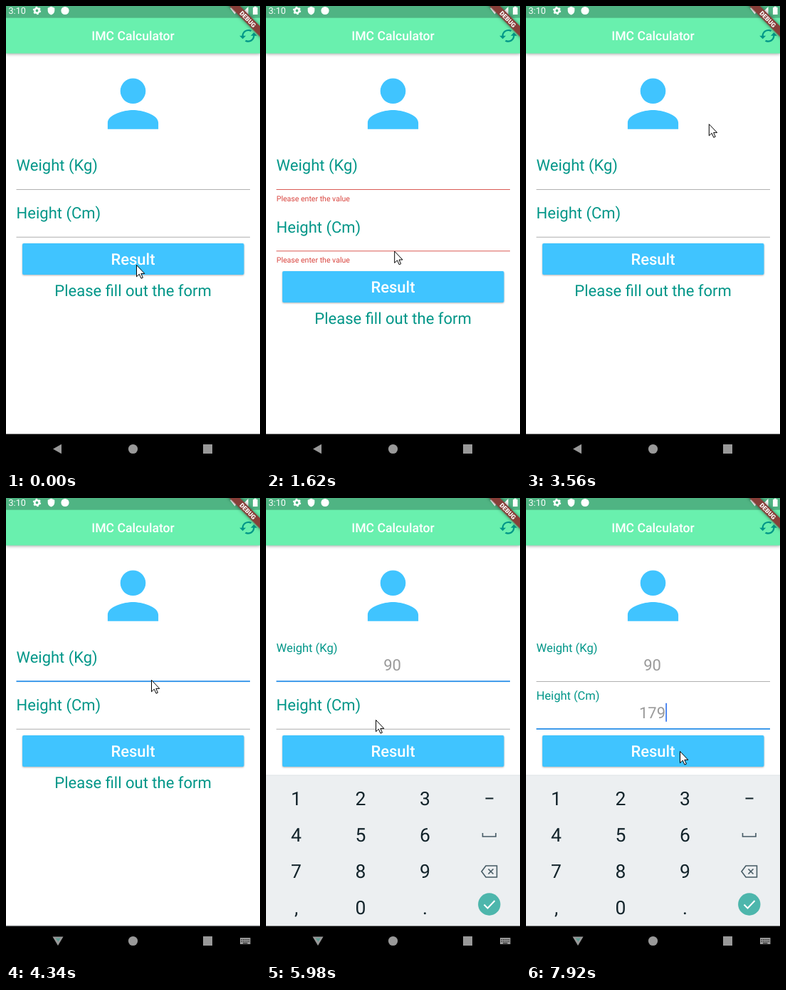
Recreate the animation shown at these times as an HTML page. Size 357x651 px, loop 8000 ms.

```html
<!DOCTYPE html>
<html lang="en">
<head>
<meta charset="utf-8">
<title>IMC Calculator</title>
<style>
  html, body { margin: 0; width: 100%; height: 100%; overflow: hidden; background: #fff; }
  svg { display: block; width: 357px; height: 651px; font-family: Roboto, sans-serif; text-rendering: geometricPrecision; }
  .mid { text-anchor: middle; }
  .teal { fill: #009688; }
  .label, .big { font-size: 22px; }
  .value { font-size: 22px; fill: #9a9a9a; }
  .error { font-size: 10.55px; fill: #d9453f; }
  .keys { font-size: 26.5px; fill: #13242b; }
  .icon { fill: none; stroke: #455a64; stroke-width: 1.6; }
  .bar { filter: drop-shadow(0 1.5px 2px rgba(0,0,0,.35)); }
  .button { filter: drop-shadow(0 1.5px 1.2px rgba(0,0,0,.3)); }
  .banner { filter: drop-shadow(0 0 2.5px rgba(0,0,0,.5)); }
</style>
</head>
<body>
<svg viewBox="0 0 357 651">
  <defs>
    <clipPath id="barClip"><rect width="357" height="66.5"/></clipPath>
    <clipPath id="buttonClip"><rect x="23" y="333" width="311.5" height="44" rx="2"/></clipPath>
    <clipPath id="bodyClip"><rect width="357" height="600.5"/></clipPath>
  </defs>
  <rect width="357" height="651" fill="#fff"/>

  <path transform="translate(125.1 83.7) scale(4.45)" fill="#40c4ff"
    d="M12 12a4 4 0 1 0 0-8 4 4 0 0 0 0 8zm0 2c-2.67 0-8 1.34-8 4v2h16v-2c0-2.66-5.33-4-8-4z"/>

  <g id="weight">
    <text class="label teal">Weight (Kg)</text>
    <text class="value mid" x="177.5" y="241.8"></text>
    <rect class="caret" y="221" width="1.8" height="26" fill="#3f7df0"/>
    <rect class="line" x="14.5" width="328.5"/>
    <text class="error" x="14.8">Please enter the value</text>
  </g>
  <g id="height">
    <text class="label teal">Height (Cm)</text>
    <text class="value mid" x="177.5" y="241.8"></text>
    <rect class="caret" y="221" width="1.8" height="26" fill="#3f7df0"/>
    <rect class="line" x="14.5" width="328.5"/>
    <text class="error" x="14.8">Please enter the value</text>
  </g>

  <g id="footer">
    <rect class="button" x="23" y="333" width="311.5" height="44" rx="2" fill="#40c4ff"/>
    <g clip-path="url(#buttonClip)"><circle id="press" cx="184" cy="363" fill="#fff"/></g>
    <text class="big mid" x="178.5" y="363" fill="#fff" font-weight="500">Result</text>
    <text class="big mid teal" x="178.5" y="406.5">Please fill out the form</text>
  </g>

  <rect class="bar" width="357" height="66.5" fill="#69f0ae"/>
  <g clip-path="url(#barClip)"><circle id="ripple" cx="340.5" cy="42" fill="#b4b8b5"/></g>
  <text class="mid" x="178.5" y="48.3" font-size="17.6" font-weight="500" fill="#fff">IMC Calculator</text>
  <path class="teal" transform="translate(327.1 28.4) scale(1.12)"
    d="M19 8l-4 4h3c0 3.31-2.69 6-6 6-1.01 0-1.97-.25-2.8-.7l-1.46 1.46C8.97 19.54 10.43 20 12 20c4.42 0 8-3.58 8-8h3zM6 12c0-3.31 2.69-6 6-6 1.01 0 1.97.25 2.8.7l1.46-1.46C15.03 4.46 13.57 4 12 4c-4.42 0-8 3.58-8 8H1l4 4 4-4z"/>

  <rect width="357" height="16.7" fill="#000" fill-opacity=".25"/>
  <g fill="#fff">
    <text x="3.5" y="11" font-size="12.6">3:10</text>
    <circle cx="43.5" cy="6.5" r="3.2" fill="none" stroke="#fff" stroke-width="2.6"/>
    <circle cx="43.5" cy="6.5" r="4.9" fill="none" stroke="#fff" stroke-width="1.6" stroke-dasharray="2.57 2.56"/>
    <path d="M63.5 .8l4.8 2v3.7c0 3-2 5-4.8 6-2.800-1-4.800-3-4.800-6V2.800z"/>
    <circle cx="83" cy="6.500" r="5.600"/>
    <path d="M315 3q6.500-5 13 0l-6.500 8.500z"/>
    <path d="M330 11.500h10.500V1z"/>
    <path d="M347 2h1.800V.7h3V2h1.800v10H347z"/>
  </g>
  <g transform="translate(357 0) rotate(45)">
    <rect class="banner" x="-35" y="20" width="70" height="10.4" fill="#873e38"/>
    <text class="mid" x="1" y="28.400" font-size="8.800" font-weight="900" fill="#fff">DEBUG</text>
  </g>

  <g clip-path="url(#bodyClip)">
    <g id="keyboard">
      <rect y="389" width="357" height="212" fill="#eceff1"/>
      <rect y="388.500" width="357" height="1" fill="#e0e3e5"/>
      <g id="keys" class="keys mid"></g>
      <path d="M308.500 421.500h11" stroke="#13242b" stroke-width="2"/>
      <path class="icon" d="M304.500 470v5h18.500v-5"/>
      <path class="icon" d="M309 516h15.500v16H309l-6-8zM312.500 520.500l7 7m0-7l-7 7"/>
      <circle cx="313.800" cy="570" r="15.700" fill="#4db6ac"/>
      <path d="M306.500 570.500l5 5 10-10.500" fill="none" stroke="#fff" stroke-width="2"/>
    </g>
  </g>

  <rect y="600.500" width="357" height="50.500" fill="#000"/>
  <g fill="#999">
    <path id="back" d="M66 621.500l12-6.700v13.400z"/>
    <g id="hide">
      <path d="M65.500 615.500h15l-7.500 12.500z"/>
      <path d="M69.500 617.500h7l-3 5z" fill="#5c9b92"/>
      <path d="M329 617h14.500v9H329z"/>
      <path d="M330.500 619.700h11.500m-11.500 2.500h11.500" stroke="#000" stroke-dasharray="1.300 1.200"/>
      <path d="M333 624.700h6.500" stroke="#000"/>
    </g>
    <circle cx="178.500" cy="621.500" r="6.600"/>
    <rect x="277" y="615" width="13" height="13"/>
  </g>

  <path id="pointer" d="M.5 .5V16.800l3.800-3.600 2.700 6 2.400-1.100-2.600-5.700h5z" fill="#fff" stroke="#000" stroke-linejoin="round"/>
</svg>
<script>
const LOOP = 8000;
const DIGIT = 22 * 0.5615;
const $ = id => document.getElementById(id);

const POINTER = [
  [0, 183, 363], [300, 183, 363], [610, 182, 351], [1540, 182, 351],
  [1620, 180, 344], [2400, 336, 46], [2950, 336, 46], [3330, 300, 93],
  [3560, 257, 165], [3880, 193, 242], [4110, 204, 255], [5080, 204, 255],
  [5450, 148, 318], [5670, 148, 318], [5900, 154, 311], [7560, 154, 311],
  [7900, 216, 355], [LOOP, 216, 355]
];
const ERROR_ON = 230, ERROR_OFF = 2570, COLLAPSE = 2770;
const KEYBOARD = 4330;

const FIELDS = [
  { id: 'weight', top: 0, focus: KEYBOARD, blur: 6060,
    typed: [[4505, '9'], [4740, '90']],
    caret: [[4420, 4905], [5300, 5680]] },
  { id: 'height', top: 66.8, focus: 6060, blur: LOOP,
    typed: [[6590, '1'], [7370, '17'], [7610, '179']],
    caret: [[6140, 7060], [7370, LOOP]] }
];

for (const f of FIELDS) {
  f.group = $(f.id);
  for (const part of ['label', 'value', 'caret', 'line', 'error'])
    f[part + 'El'] = f.group.querySelector('.' + part);
}

['123', '456', '789', ',0.'].forEach((row, r) => {
  [...row].forEach((key, c) => {
    const el = document.createElementNS('http://www.w3.org/2000/svg', 'text');
    el.setAttribute('x', 42.5 + 90.5 * c);
    el.setAttribute('y', 431.2 + 51 * r);
    el.textContent = key;
    $('keys').append(el);
  });
});

const set = (el, attrs) => {
  for (const name in attrs) el.setAttribute(name, attrs[name]);
};
const show = (el, on) => set(el, { visibility: on ? 'visible' : 'hidden' });
const ramp = (t, from, to) => Math.min(1, Math.max(0, (t - from) / (to - from)));
const ease = p => p * p * (3 - 2 * p);
const mix = (a, b, p) => a + (b - a) * p;
const move = (el, x, y) => set(el, { transform: `translate(${x} ${y})` });

function pointerAt(t) {
  const i = POINTER.findIndex(k => k[0] > t);
  const [t0, x0, y0] = POINTER[i - 1], [t1, x1, y1] = POINTER[i];
  const p = ramp(t, t0, t1);
  return [mix(x0, x1, p), mix(y0, y1, p)];
}

function drawField(f, t, shift, error) {
  move(f.group, 0, f.top + (f.top ? shift : 0));

  const float = ease(ramp(t, f.focus, f.focus + 170));
  set(f.labelEl, {
    transform: `translate(14.6 ${mix(231.3, 216, float)}) scale(${mix(1, 0.75, float)})`
  });

  const text = f.typed.reduce((s, [at, value]) => t >= at ? value : s, '');
  f.valueEl.textContent = text;
  set(f.caretEl, { x: 177.7 + text.length * DIGIT / 2 });
  show(f.caretEl, f.caret.some(([on, off]) => t >= on && t < off));

  const focused = t >= f.focus && t < f.blur;
  const mixed = [[176, 217], [176, 90], [176, 84]].map(([a, b]) => Math.round(mix(a, b, error)));
  set(f.lineEl, focused
    ? { y: 256.3, height: 1.8, fill: '#2a8fe8' }
    : { y: 257, height: 1, fill: `rgb(${mixed})` });
  set(f.errorEl, { y: mix(271, 274, error), opacity: error });
}

function drawSplash(el, t, start, grow, fadeStart, fadeEnd, radius, alpha) {
  const p = ramp(t, start, start + grow);
  set(el, {
    r: radius * ease(p),
    opacity: alpha * (1 - ramp(t, fadeStart, fadeEnd))
  });
}

function draw(t) {
  const shift = t >= ERROR_ON && t < COLLAPSE ? 19.5 : 0;
  const error = ease(ramp(t, ERROR_ON, ERROR_ON + 200)) * (1 - ease(ramp(t, ERROR_OFF, COLLAPSE)));
  FIELDS.forEach(f => drawField(f, t, shift, error));
  move($('footer'), 0, shift * 2);

  drawSplash($('press'), t, 80, 330, 250, 600, 170, 0.18);
  drawSplash($('ripple'), t, 2540, 200, 2850, 3150, 32.5, 0.5);

  const raised = ease(ramp(t, KEYBOARD, KEYBOARD + 170));
  move($('keyboard'), 0, 213 * (1 - raised));
  show($('keyboard'), raised > 0);
  show($('hide'), raised > 0);
  show($('back'), raised === 0);

  move($('pointer'), ...pointerAt(t));
}

const start = performance.now();
function tick() {
  draw((performance.now() - start) % LOOP);
  requestAnimationFrame(tick);
}
tick();
</script>
</body>
</html>
```
